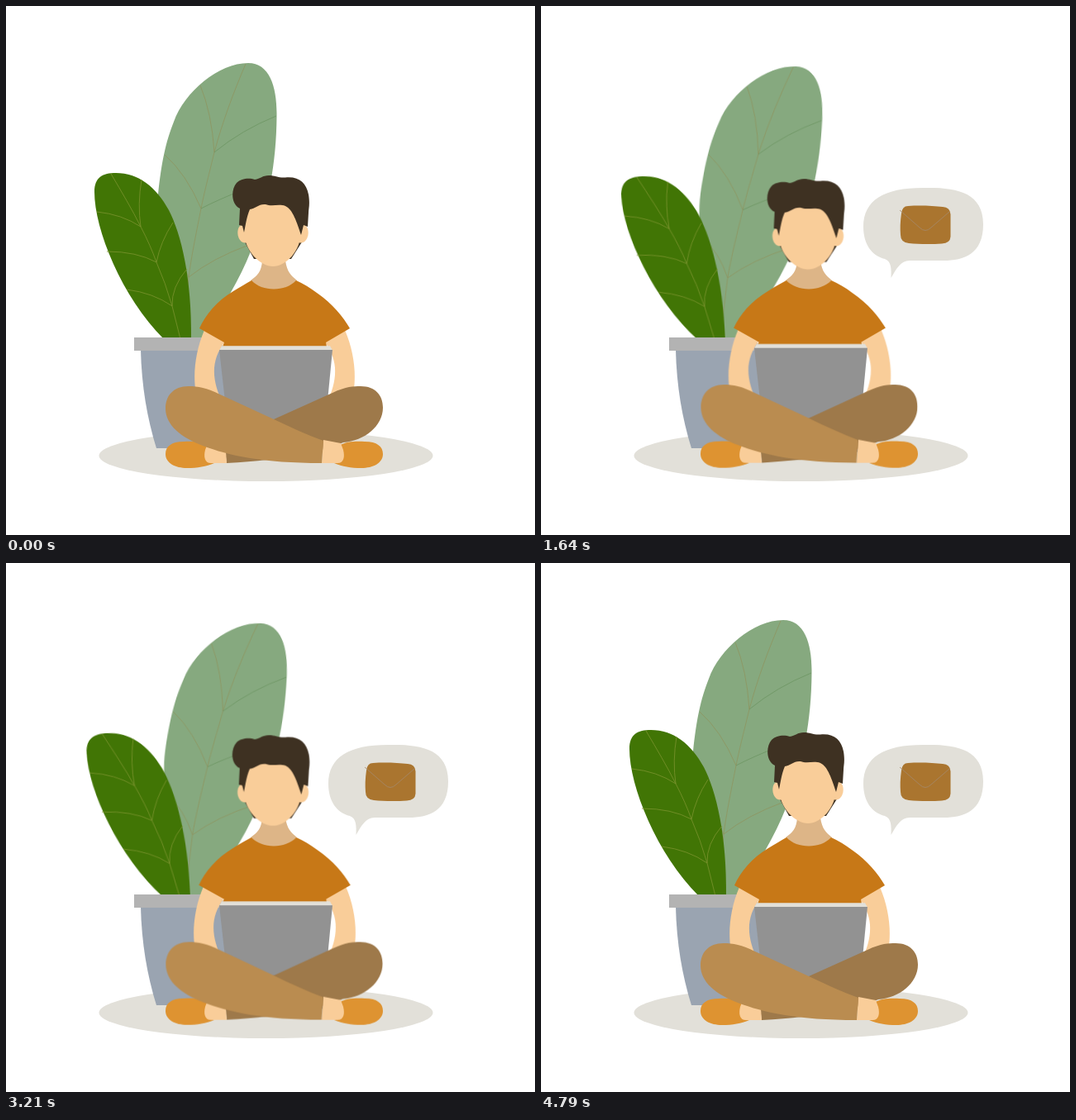
An HTML page without scripts that plays this animation: 640x640 px, repeating every 4870 ms.

```html
<!DOCTYPE html>
<html lang="en">
<head>
<meta charset="utf-8">
<title>Working at a laptop</title>
<style>
  html, body { margin: 0; width: 100%; height: 100%; overflow: hidden; background: #fff; }
  svg { display: block; width: 100%; height: 100%; }

  .skin { fill: #f9cd99; }
  .hair { fill: #3e3122; }
  .vein { fill: none; stroke-width: .8; }

  .leaf { animation: sway 2.435s cubic-bezier(.37, 0, .63, 1) -40ms infinite alternate; }
  .big { --turn: 3deg; transform-origin: 200px 445px; }
  .small { --turn: -3.6deg; transform-origin: 211px 427px; }

  .body { animation: breathe 4.87s cubic-bezier(.37, 0, .63, 1) -40ms infinite; }
  .head { --pose: translateY(8.4px) scale(1.02, .99); transform-origin: 321px 260px; }
  .arms { --pose: translateY(-3px) scale(1.03, 1); transform-origin: 325px 395px; }
  .shirt { --pose: translateY(0px) scale(1.02, .985); transform-origin: 325px 332px; }
  .laptop { --pose: translateY(-1px) scale(1, 1.028); transform-origin: 325px 553px; }
  .leg { --pose: translateY(-1px) scale(.992, 1.032); transform-origin: 324.5px 553px; }
  .feet { --pose: translateY(-.7px) scale(1, 1); }

  .bubble {
    transform-origin: 423.5px 328px;
    animation: pop 4.87s cubic-bezier(.37, 0, .63, 1) infinite;
  }

  @keyframes sway { from { transform: rotate(0deg); } to { transform: rotate(var(--turn)); } }
  @keyframes breathe {
    0%, 24.64%, 75.36%, 100% { transform: none; }
    45.17%, 54.83% { transform: var(--pose); }
  }
  @keyframes pop {
    0% { transform: scale(0); }
    23.6%, 100% { transform: scale(1); }
  }
</style>
</head>
<body>
<svg viewBox="0 0 640 640">
  <defs>
    <path id="arm" d="M240 392C226 425 225 460 234 485L262 480C250 455 246 430 265 406Z"/>
    <g id="foot">
      <path fill="#de9331" d="M246 532C238 527 228 526.5 215 527C200 527 193 533 193 542C193 553 205 559 219 559C232 559 242 557 252 553Z"/>
      <path class="skin" d="M244 529L265 525L267 553H248C240 553 239 545 241 537Z"/>
    </g>
    <path id="ear" d="M289 264C280 263 278 276 283 283C286 287 289 287 292 286Z"/>
  </defs>

  <ellipse cx="314.5" cy="544" rx="202" ry="31" fill="#e2e0d9"/>

  <g class="leaf big">
    <path fill="#86a97f" d="M222 410C195 330 180 270 184 228C188 190 193 165 203 140C216 104 257 69 293 69C319 69 328 98 327.5 133C327 190 318 240 296 297C283 330 262 365 238 402Z"/>
    <path class="vein" stroke="#8f9560" d="M290 70C275 105 262 140 252 177C244 210 240 225 236 245C229 280 224 305 221 328L215 402M235 96Q249 130 252 177M192 180Q218 203 236 245M188 280Q210 298 221 328"/>
    <path class="vein" stroke="#6c9563" d="M252 177Q285 150 327 133M236 245Q255 235 290 221"/>
    <path class="vein" stroke="#8f9560" d="M221 328Q250 305 294 289"/>
  </g>

  <g class="leaf small">
    <path fill="#417505" d="M191 403C140 352 107 270 107 225C107 207 117 202 133 202C160 202 182 219 197 247C212 276 225 330 224 403V412H200Z"/>
    <path class="vein" stroke="#7b932f" d="M127 203C140 225 153 247 163 267Q175 290 182 310Q193 335 201 363L211 403M164 210Q159 240 163 267M110 249Q140 252 163 267M122 297Q158 297 182 310M202 262Q187 285 182 310M146 343Q178 347 201 363M219 318Q200 340 201 363"/>
  </g>

  <path fill="#9aa4b1" d="M163 416C164 460 171 500 182 535H230L280 500V416Z"/>
  <path fill="#b3b3b3" d="M155 401H262V417H155Z"/>

  <path fill="#ddb587" d="M310 308H338C340 322 345 326 352 332C338 347 310 347 296 332C304 326 309 322 310 308Z"/>
  <g class="body arms skin">
    <use href="#arm"/>
    <use href="#arm" transform="matrix(-1 0 0 1 650 0)"/>
  </g>
  <path class="body shirt" fill="#c77817" d="M297 332C290 336 283 340 275 345C255 357 241 374 234 390L264 407L262 412H388L387 407L416 390C408 376 395 360 376 347C368 341 360 336 351 332C338 346 310 346 297 332Z"/>

  <g class="body head">
    <path class="hair" d="M288 284L300 306H345L359 284Z"/>
    <g class="skin">
      <use href="#ear"/>
      <use href="#ear" transform="matrix(-1 0 0 1 646 0)"/>
      <path d="M291 238H352L357 272C357 297 338 315 323 315C308 315 288 297 288 272Z"/>
    </g>
    <path class="hair" d="M283 245C272 240 272 222 279 214C285 208 295 208 301 210C308 209 310 205 318 205C326 205 329 208 338 207.5C355 206 363 214 366 228C368 240 366 245 366 250L365 267L360 265L357 277C352 262 347 246 338 242C330 239 322 243 314 240C306 239 302 245 295 246C291 255 290 265 288 274L286 266L282 265Z"/>
  </g>

  <g class="body laptop">
    <path fill="#e2e0d9" d="M261 411.3H392L395 416.5H258Z"/>
    <path fill="#929292" d="M258 416H395L383 540H272Z"/>
  </g>

  <path class="body leg" fill="#9e794a" d="M324 500L395 468C412 460 420 460 429 460C447 460 456 471 456 486C456 508 434 526 408 528C380 540 340 549 267 553L265 538Z"/>
  <g class="body feet">
    <use href="#foot"/>
    <use href="#foot" transform="matrix(-1 0 0 1 649 0)"/>
  </g>
  <path class="body leg" fill="#ba8c50" d="M324 500L259 470C243 462 232 460 221 460C202 460 193 472 193 487C193 507 212 522 238 532C270 544 310 553 382 553L384 526C365 519 345 510 324 500Z"/>

  <g class="bubble">
    <path fill="#e2e0d9" d="M462 220C500 219 535 224 535 264C535 300 512 308 487 308H446C435 308 430 318 423.5 329C424 318 424 309 416 306C400 302 390 288 390 267C390 235 415 220 462 220Z"/>
    <path fill="#aa752f" d="M444 242C460 241 475 242 486 243Q495 243.5 495.5 252V279Q495 287 485 287.5C470 288.5 455 288 445 287Q435 286 435 277Q434 265 436 251Q437 242 444 242Z"/>
    <path class="vein" stroke="#a58a6c" d="M434 247L458 268Q465 275 472 268L494 249"/>
  </g>
</svg>
</body>
</html>
```
